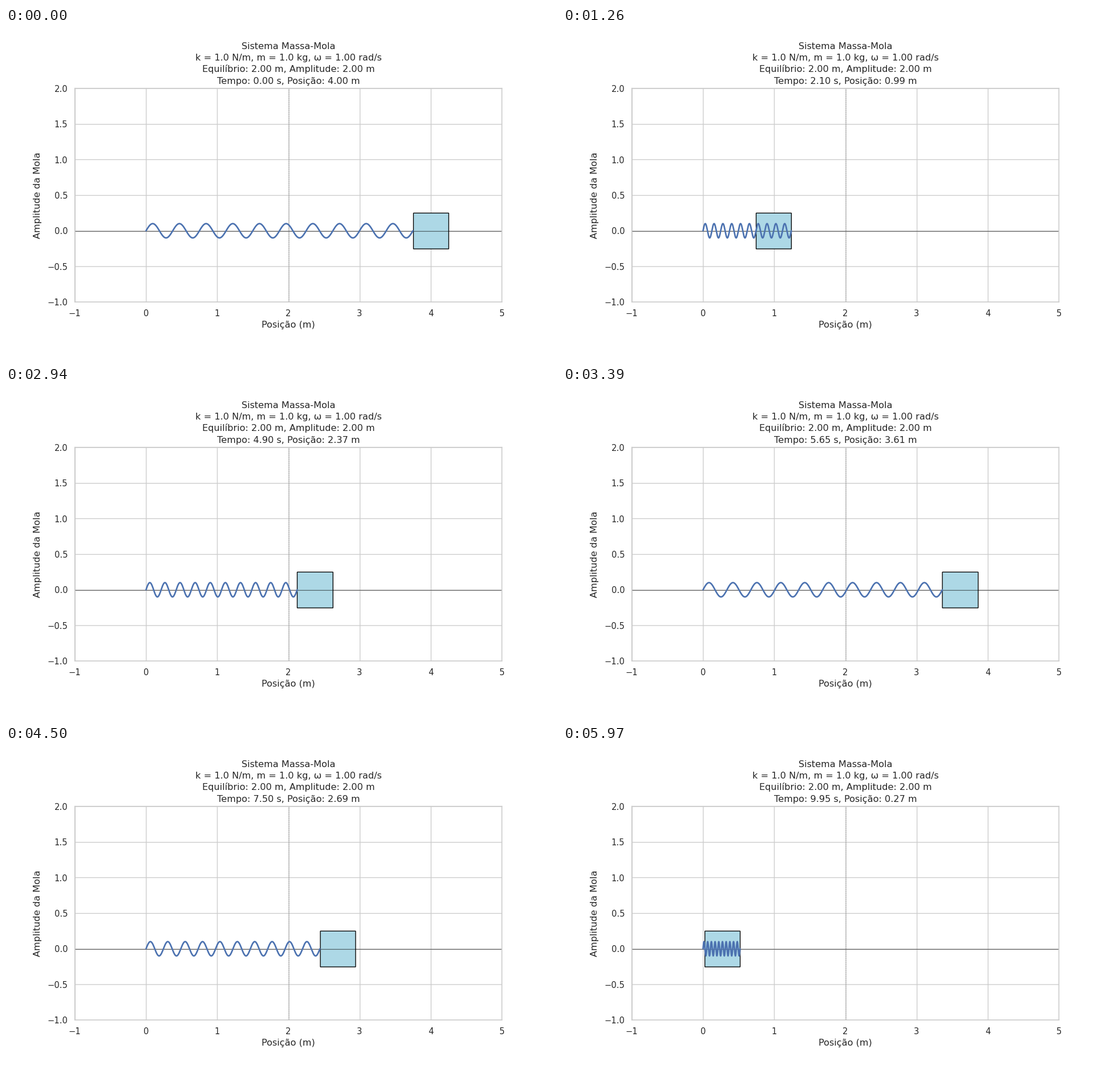
Write a matplotlib script that moves like this. It is 966 px wide and 580 px high and loops after 6000 ms.

```python
import numpy as np
import matplotlib.pyplot as plt
from matplotlib.animation import FuncAnimation
from matplotlib.patches import Rectangle

K, M = 1.0, 1.0
OMEGA = np.sqrt(K / M)
EQ, AMP = 2.0, 2.0
SIDE = 0.5
COILS = 10
FRAMES, INTERVAL, DT = 200, 30, 0.05

# layout grid of 1000 x 600 cells: cells per data unit and the data origin
UNIT = 775 / 6
COL0, ROW0 = 125 + UNIT, 303 + UNIT / 2
LINE_PT = 21 * 72 / 100

INK, GRID = "0.15", "0.8"
plt.rcParams.update({
    "font.family": "DejaVu Sans",
    "text.color": INK, "axes.labelcolor": INK,
    "xtick.color": INK, "ytick.color": INK,
    "axes.labelsize": 12, "xtick.labelsize": 11, "ytick.labelsize": 11,
    "axes.edgecolor": GRID, "axes.linewidth": 1.25,
    "xtick.bottom": False, "ytick.left": False,
    "xtick.major.size": 6, "ytick.major.size": 6,
    "lines.solid_capstyle": "round",
})


def to_cell(v, origin, step):
    """Move a data coordinate to the centre of its layout cell."""
    cell = np.floor(origin + v * step + 0.5) + 0.5
    return (cell - origin) / step


def cell_x(x):
    return to_cell(x, COL0, UNIT)


def cell_y(y):
    return to_cell(y, ROW0, -UNIT)


def vline(x, **style):
    ax.axvline(cell_x(x), snap=False, **style)


def hline(y, **style):
    ax.axhline(cell_y(y), snap=False, **style)


# 966 x 580 pixels
fig, ax = plt.subplots(figsize=(10, 6.00415), dpi=96.6)
ax.set_xlim(-1, 5)
ax.set_ylim(-1, 2)
ax.set_aspect("equal")
ax.set_xticks(np.arange(-1, 6))
ax.set_yticks(np.arange(-1, 2.5, 0.5))
ax.set_xlabel("Posição (m)")
ax.set_ylabel("Amplitude da Mola", labelpad=6.5)
for spine in ax.spines.values():
    spine.set_snap(False)

grid = dict(color=GRID, lw=1, zorder=0.5)
for x in np.arange(-1, 6):
    vline(x, **grid)
for y in np.arange(-1, 2.5, 0.5):
    hline(y, **grid)
hline(0, color="black", lw=0.5)
vline(EQ, color="gray", lw=0.5, ls="--")

spring, = ax.plot([], [], color="#4C72B0", lw=2)
bottom, top = cell_y(-SIDE / 2), cell_y(SIDE / 2)
block = ax.add_patch(Rectangle((0, bottom), SIDE, top - bottom,
                               fc="lightblue", ec="black", lw=1, snap=False))


def title_line(text, row):
    return ax.annotate(text, (0.5, 1), xycoords="axes fraction",
                       xytext=(0, 6 + row * LINE_PT),
                       textcoords="offset points", ha="center", fontsize=12)


title_line("Sistema Massa-Mola", 3)
title_line(f"k = {K:.1f} N/m, m = {M:.1f} kg, ω = {OMEGA:.2f} rad/s", 2)
title_line(f"Equilíbrio: {EQ:.2f} m, Amplitude: {AMP:.2f} m", 1)
status = title_line("", 0)

s = np.linspace(0, 1, 500)
wave = 0.1 * np.sin(2 * np.pi * COILS * s)


def update(i):
    t = i * DT
    x = EQ + AMP * np.cos(OMEGA * t)
    # the spring ends at the right face once the mass passes equilibrium
    end = x - SIDE / 2 if x > EQ else x + SIDE / 2
    spring.set_data(s * end, wave)
    left, right = cell_x(x - SIDE / 2), cell_x(x + SIDE / 2)
    block.set_x(left)
    block.set_width(right - left)
    status.set_text(f"Tempo: {t:.2f} s, Posição: {x:.2f} m")
    return spring, block, status


anim = FuncAnimation(fig, update, frames=FRAMES, interval=INTERVAL,
                     repeat=True, repeat_delay=0)
plt.show()
```
